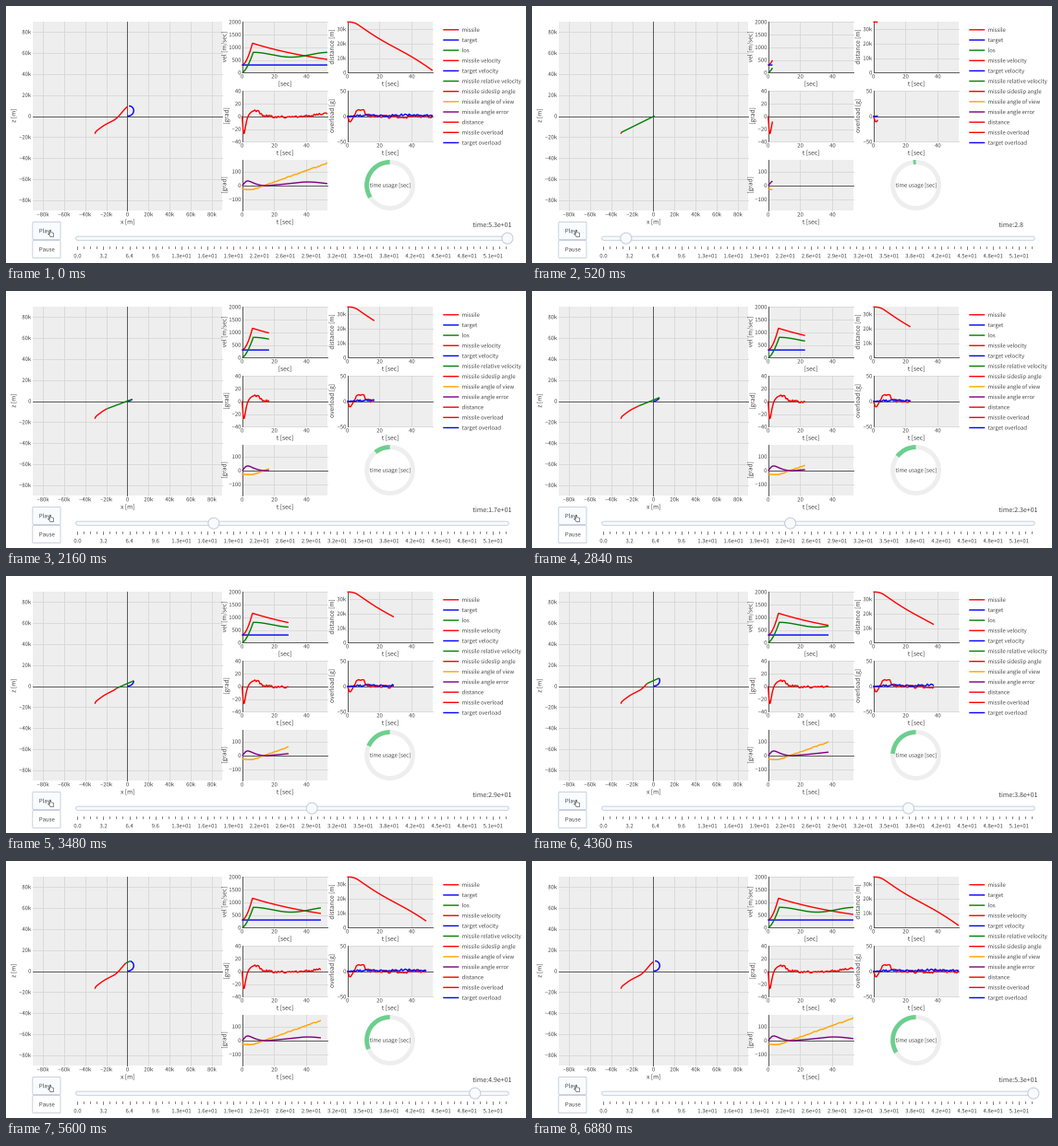
A matplotlib script for the animation above (7000 ms loop, 563x279 px).

```python
import numpy as np
import matplotlib.pyplot as plt
from matplotlib.animation import FuncAnimation
from matplotlib.patches import (Circle, FancyBboxPatch, PathPatch, Polygon,
                                Rectangle, Wedge)
from matplotlib.textpath import TextPath
from matplotlib.transforms import Affine2D

W, H, DPI = 563, 279, 72  # at 72 dpi one point is one pixel
FRAMES, STEP = 175, 40
T_END, DT = 53.0, 0.2

plt.rcParams["font.family"] = "Noto Sans CJK JP"
INK, PANEL, GRID, ZERO = "#444444", "#eeeeee", "#d8d8d8", "#4c4c4c"
EDGE, SOFT = "#bec8d9", "#f8fafc"
RED, BLUE, GREEN = "#ff0000", "#0000ff", "#008000"
ORANGE, PURPLE = "#ffa500", "#800080"

fig = plt.figure(figsize=(W / DPI, H / DPI), dpi=DPI, facecolor="white")
ax = fig.add_axes([0, 0, 1, 1])
ax.set_xlim(0, W)
ax.set_ylim(H, 0)
ax.axis("off")


def label(x, y, s, size=5.9, align=0.5, turn=0):
    """Outlined text, so that small letters keep their exact spacing."""
    path = TextPath((0, 0), s, size=size)
    place = (Affine2D().translate(-align * path.get_extents().x1, -0.36 * size)
             .scale(1, -1).rotate_deg(turn).translate(x, y))
    return ax.add_patch(PathPatch(path, fc=INK, lw=0, zorder=5, snap=False,
                                  transform=place + ax.transData))


def tick_name(v):
    s = f"{abs(v) / 1000:g}k" if abs(v) >= 10000 else f"{abs(v):g}"
    return "\u2212" + s if v < 0 else s


def number(v):
    return f"{v:.1f}" if v < 9.95 else f"{v:.1e}"


class Panel:
    def __init__(self, left, top, width, height, xlim, ylim, xstep, ystep,
                 xname, yname, gap=18):
        self.x0, self.x1 = left, left + width
        self.y0, self.y1 = top, top + height
        self.xlim, self.ylim = xlim, ylim
        ax.add_patch(Rectangle((left, top), width, height, fc=PANEL, lw=0,
                               zorder=0))
        for v in self.ticks(xlim, xstep):
            x = self.px(v)
            self.rule([x, x], [self.y0, self.y1], v)
            label(x, self.y1 + 4, tick_name(v))
        for v in self.ticks(ylim, ystep):
            y = self.py(v)
            self.rule([self.x0, self.x1], [y, y], v)
            label(self.x0 - 1.4, y, tick_name(v), align=1)
        label((self.x0 + self.x1) / 2, self.y1 + 12, xname, 6.6)
        label(left - gap, top + height / 2, yname, 6.6, turn=-90)

    @staticmethod
    def ticks(lim, step):
        return np.arange(np.ceil(lim[0] / step), lim[1] // step + 1) * step

    def rule(self, xs, ys, v):
        ax.plot(xs, ys, color=GRID if v else ZERO, lw=0.9,
                zorder=1 if v else 1.5)

    def px(self, v):
        a, b = self.xlim
        return self.x0 + (np.asarray(v) - a) / (b - a) * (self.x1 - self.x0)

    def py(self, v):
        a, b = self.ylim
        return self.y1 - (np.asarray(v) - a) / (b - a) * (self.y1 - self.y0)


def chart(col, row, ylim, ystep, yname, xname="t [sec]", gap=17):
    return Panel(255.5 + 114 * col, 17.3 + 75 * row, 92.4, 55, (0, T_END),
                 ylim, 20, ystep, xname, yname, gap)


FAR = (-90000, 90000)
field = Panel(28.5, 16.8, 205.8, 205.4, FAR, FAR, 20000, 20000,
              "x [m]", "z [m]", 20.5)
speed = chart(0, 0, (0, 2000), 500, "vel [m/sec]", "[sec]", 19.5)
slip = chart(0, 1, (-40, 40), 20, "[grad]")
angle = chart(0, 2, (-182, 182), 100, "[grad]", gap=19.5)
dist = chart(1, 0, (0, 35000), 10000, "distance [m]")
load = chart(1, 1, (-50, 50), 50, "overload [g]")

# simulated flight
T = np.arange(0, T_END + DT / 2, DT)
rng = np.random.RandomState(4)


def bump(mid, width):
    return np.exp(-((T - mid) / width) ** 2)


def pulse(peak):
    return (T / peak * np.exp(1 - T / peak)) ** 2


def jitter(amp, start=0):
    t = np.arange(0, T_END + 1, 0.8)
    return np.interp(T, t, rng.uniform(-amp, amp, t.size)) * (T > start)


def integral(v):
    return np.cumsum(v) * DT


missile_v = np.where(T < 6.5, 300 + 860 * (T / 6.5) ** 1.8,
                     1160 * np.exp((6.5 - T) / 58))
target_v = np.full(T.size, 300.0)
closing_v = np.where(T < 7, 800 * (T / 7) ** 1.6,
                     705 + 95 * np.cos(2 * np.pi * (T - 7) / 47))
distance = 35000 - 0.97 * integral(closing_v)

heading = np.radians(182) * (T / T_END) ** 1.2
target_x = integral(target_v * np.cos(heading))
target_z = integral(target_v * np.sin(heading))
bearing = np.radians(24 - 3.5 * bump(16, 9) + 5 * np.exp(-T / 5))
missile_x = target_x - distance * np.cos(bearing)
missile_z = target_z - distance * np.sin(bearing)

sideslip = (9 * bump(8, 4.5) - 28 * pulse(1.2) + 4 * bump(53, 9)
            - bump(26, 9) + jitter(2, 7))
view = np.maximum(-30, 160 - 4.1 * (T_END - T)) + 8 * np.exp(-T) + jitter(3, 7)
error = 32 * pulse(3.6) + 25 * bump(41, 15) - 4 * bump(14, 4)
missile_g = 14 * bump(8, 4) - 12 * pulse(1.8) - bump(30, 15) + jitter(3, 5)
target_g = 1 + 2 * bump(38, 14) + jitter(2)

# growing lines and their legend
series = [
    ("missile", RED, field, missile_x, missile_z),
    ("target", BLUE, field, target_x, target_z),
    ("los", GREEN, None, None, None),
    ("missile velocity", RED, speed, T, missile_v),
    ("target velocity", BLUE, speed, T, target_v),
    ("missile relative velocity", GREEN, speed, T, closing_v),
    ("missile sideslip angle", RED, slip, T, sideslip),
    ("missile angle of view", ORANGE, angle, T, view),
    ("missile angle error", PURPLE, angle, T, error),
    ("distance", RED, dist, T, distance),
    ("missile overload", RED, load, T, missile_g),
    ("target overload", BLUE, load, T, target_g),
]


def stroke(color, xs=(), ys=(), z=3):
    return ax.plot(xs, ys, color=color, lw=1.4, zorder=z, snap=False,
                   solid_capstyle="butt", solid_joinstyle="round")[0]


traces = []
for i, (name, color, panel, x, y) in enumerate(series):
    row = 25.8 + 11.15 * i
    stroke(color, [473.3, 490.3], [row, row])
    label(493.6, row, name, align=0)
    if panel:
        traces.append((stroke(color), panel.px(x), panel.py(y)))
sight = stroke(GREEN, z=4)
(_, mx, my), (_, tx, ty) = traces[:2]

# time usage ring
HUB, R, BAND = (415.6, 194.5), 27.4, 4.8
ax.add_patch(Wedge(HUB, R, 0, 360, width=BAND, fc=PANEL, lw=0))
usage = ax.add_patch(Wedge(HUB, R, 269, 270, width=BAND, fc="#6ccf8e", lw=0,
                           zorder=3))
label(*HUB, "time usage [sec]")


# buttons and pointer
def rounded(x, y, w, h, r, fc):
    ax.add_patch(FancyBboxPatch((x, y), w, h, fc=fc, ec=EDGE, lw=0.8, zorder=2,
                                boxstyle=f"round,pad=0,rounding_size={r}"))


for y, name, fill in [(234.5, "Play", "#f8fcff"), (254.6, "Pause", "white")]:
    rounded(28.8, y, 30.2, 19, 1, fill)
    label(35.8, y + 9.6, name, 6, align=0)
hand = [(47.3, 243.2), (48.4, 243.2), (48.7, 245.6), (51.4, 246.4),
        (51.4, 250.6), (48.2, 250.6), (45.8, 247.4), (47.3, 247.6)]
ax.add_patch(Polygon(hand, fc="white", ec="#444444", lw=0.6, zorder=6))

# slider
X0, PER_SEC, Y = 77.3, 8.785, 252.2
rounded(75.7, Y - 2.1, 468.5, 4.2, 2, SOFT)
for i in range(67):
    major = i % 4 == 0
    x = X0 + 0.8 * i * PER_SEC
    ax.plot([x, x], [260.8, 264.4 if major else 263], color=ZERO, lw=0.7)
    if major:
        label(x, 271.2, number(0.8 * i))
grip = ax.add_patch(Circle((X0, Y), 6, fc=SOFT, ec=EDGE, lw=0.9, zorder=5))
clock = label(505.3, 237.5, "time:", 7, align=0)


def sim_time(ms):
    if ms < STEP:
        return T_END
    return float(np.interp(ms, [40, 1000, 2160, 3480, 4360, 5600, 6040],
                           [0, 5.6, 16.8, 28.9, 37.6, 49, T_END]))


def update(n):
    t = sim_time(n * STEP)
    k = np.searchsorted(T, t)

    def at(v):
        return np.interp(t, T, v)

    for line, x, y in traces:
        line.set_data(np.append(x[:k], at(x)), np.append(y[:k], at(y)))
    sight.set_data([at(mx), at(tx)], [at(my), at(ty)])
    sight.set_visible(t < T_END)
    usage.set_theta1(270 - max(0.1, 2.3 * t))
    grip.center = (X0 + t * PER_SEC, Y)
    clock.set_path(TextPath((0, 0), "time:" + number(t), size=7))
    return []


anim = FuncAnimation(fig, update, frames=FRAMES, init_func=lambda: [],
                     interval=STEP, repeat=True, repeat_delay=0, blit=False)
plt.show()
```
